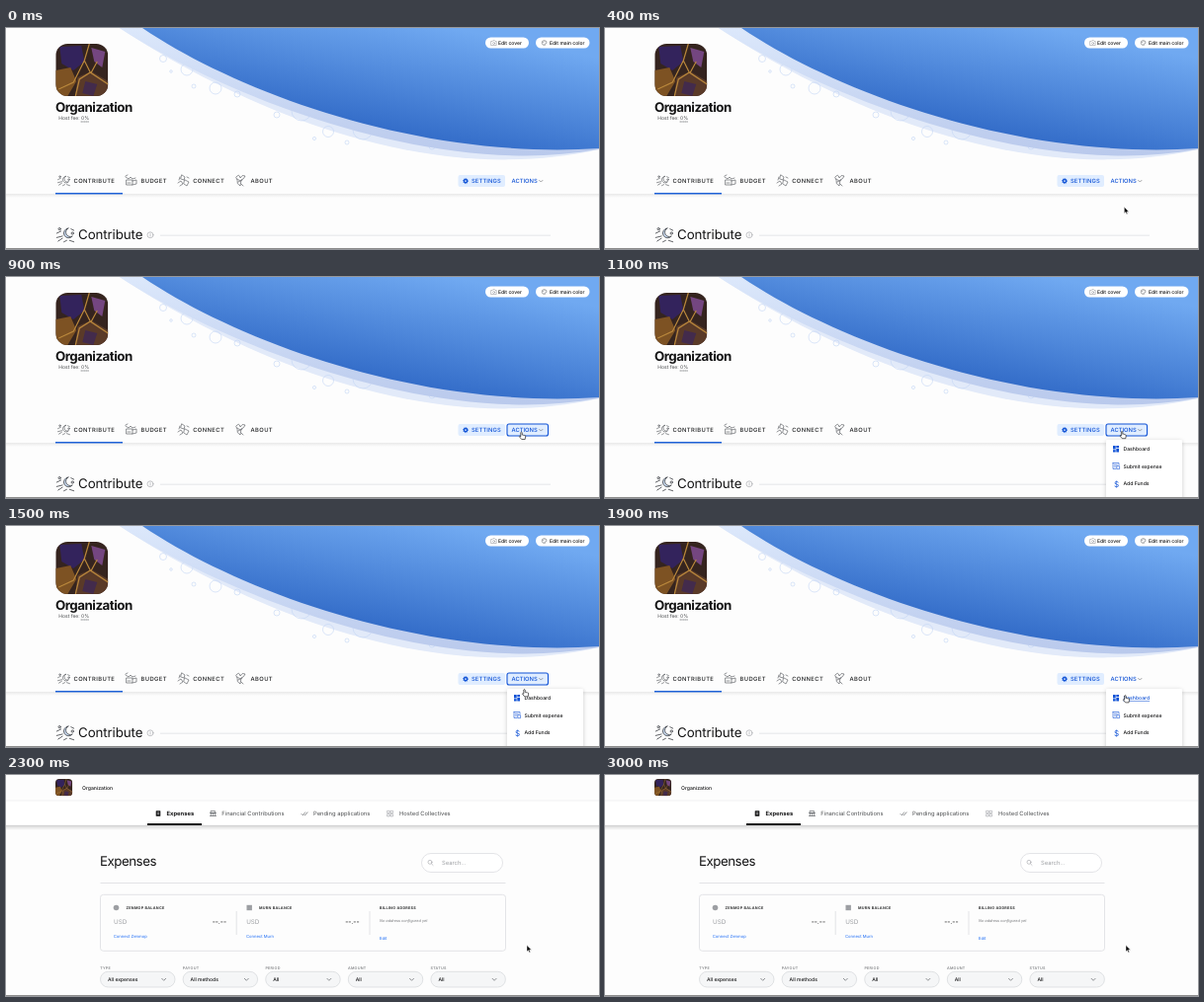
Write an HTML page that moves like this. It is 600 px wide and 224 px high and loops after 5000 ms.

```html
<!DOCTYPE html>
<html lang="en">
<head>
<meta charset="utf-8">
<title>Organization dashboard</title>
<style>
  html, body { margin: 0; width: 100%; height: 100%; overflow: hidden; background: #fdfdfd; }
  svg { display: block; font: 5px Inter, sans-serif; fill: #141415; text-rendering: geometricPrecision; }
  .line { fill: none; stroke: #4b4e52; stroke-width: .6; stroke-linecap: round; stroke-linejoin: round; }
  .thin { fill: none; stroke: #8c8f94; stroke-width: .5; stroke-linecap: round; }
  .medium { font-weight: 500; }
  .title { font-size: 13.33px; }
  .nav { font-size: 5.83px; font-weight: 500; letter-spacing: .4px; fill: #1f2022; }
  .button { font-size: 5.83px; font-weight: 500; fill: #1153d6; }
  .menu { font-size: 5.1px; font-weight: 500; }
  .hover { fill: #1153d6; text-decoration: underline; }
  .tabs { font-size: 5.83px; fill: #4d4f51; }
  .caps { font-size: 3.75px; font-weight: 700; letter-spacing: .25px; fill: #313233; }
  .label { font-size: 3.75px; font-weight: 500; letter-spacing: .25px; fill: #75777a; }
  .link { font-size: 4.17px; fill: #1869f5; }
  .blue { fill: #1153d6; }
</style>
</head>
<body>
<svg width="600" height="224" viewBox="0 0 600 224">
  <defs>
    <linearGradient id="sky" gradientUnits="userSpaceOnUse" x1="450" y1="0" x2="425" y2="125">
      <stop stop-color="#70a9f1"/><stop offset="1" stop-color="#2d66c4"/>
    </linearGradient>
    <linearGradient id="haze" x2="0" y2="1">
      <stop stop-color="#dce8fb"/><stop offset="1" stop-color="#b9c9ec"/>
    </linearGradient>
    <linearGradient id="shade" x2="0" y2="1">
      <stop stop-color="#000" stop-opacity=".16"/><stop offset="1" stop-color="#000" stop-opacity="0"/>
    </linearGradient>
    <filter id="soft" x="-20%" y="-20%" width="140%" height="140%">
      <feDropShadow dx="0" dy="1" stdDeviation="2" flood-opacity=".2"/>
    </filter>
    <clipPath id="rounded"><rect width="53" height="53" rx="12"/></clipPath>

    <g id="photo" clip-path="url(#rounded)">
      <path fill="#35241f" d="M0 0H53V53H0Z"/>
      <path fill="#33235c" d="M4 3 26 2 29 18 18 27 6 20Z"/>
      <path fill="#744680" d="M36 4 50 8 47 24 39 18Z"/>
      <path fill="#7d5223" d="M0 27 15 24 21 38 12 53H0Z"/>
      <path fill="#5a3a28" d="M22 34 36 28 53 38V53H20Z"/>
      <path fill="#432b4c" d="M30 38 42 41 38 53 27 50Z"/>
      <path fill="none" stroke="#b9873c" stroke-width="1.2" d="M34 0 29 17 35 29 53 41M29 17 18 39 3 46M35 29 24 36 20 53M42 18 36 29"/>
    </g>
    <g id="spark" class="line">
      <path d="M2-4.5a3.4 3.4 0 1 0 3 5.5 3 3 0 0 1-3-5.5ZM-6-1l3-1.5M-6 2l4-1M-5 4.5l3-2M3 4l3 1M4-4l2 1M-1 5l2-1"/>
      <circle cx="5" cy="-1" r=".8"/><circle cx="-4" cy="-4" r=".8"/>
    </g>
    <path id="chevron" class="line" d="M-2-1 0 1 2-1"/>
    <g id="receipt"><rect x="-2.3" y="-2.8" width="4.6" height="5.6" rx=".5"/><path stroke="#fff" stroke-width=".6" d="M-1.2-1H1.2M-1.2.6H1.2"/></g>

    <path id="arrow" fill="#000" stroke="#fff" stroke-width=".5" d="M0 0V6.6L1.5 5.2 2.5 7.5 3.6 7 2.6 4.8H4.7Z"/>
    <path id="hand" fill="#fff" stroke="#111" stroke-width=".65" stroke-linejoin="round" d="M-.7.5Q0-.5.7.5V3Q1.5 2.4 2 3.2 2.8 2.7 3.2 3.6 4.2 3.4 4.2 4.5L3.7 7.4H.2L-2.1 4.7Q-2 3.7-.7 4.6Z"/>
  </defs>

  <g id="profile">
    <path fill="#e2eaf9" d="M115 0C215 66 410 166 600 123V0Z"/>
    <g id="bubbles" fill="none" stroke="#c3d5f5" stroke-width=".6"></g>
    <path fill="url(#haze)" d="M115 0C215 66 430 154 600 123V0Z"/>
    <path fill="url(#sky)" d="M138 0C235 66 420 134 600 122V0Z"/>

    <g fill="#fff">
      <rect x="485" y="9.5" width="44" height="11" rx="5.5"/>
      <rect x="536" y="9.5" width="54.5" height="11" rx="5.5"/>
    </g>
    <g class="thin">
      <path d="M491 13.5h1.2l.6-.9h1.6l.6.9h1.2v4H491Z"/><circle cx="493.6" cy="15.5" r="1"/>
      <path stroke="#4b4e52" d="M545 17.4a2.4 2.4 0 1 1 2-2.3c0 1-1.8.2-1.8 1.1ZM543.3 14.5h.1M544.8 13.8h.1"/>
    </g>
    <g class="medium"><text x="498" y="16.8">Edit cover</text><text x="550" y="16.8">Edit main color</text></g>

    <use href="#photo" x="50.3" y="16"/>
    <text class="title" x="50" y="84.6" font-weight="700" letter-spacing="-.5">Organization</text>
    <text x="53.3" y="93.2" fill="#4d4f51">Host fee: 0%</text>
    <path class="line" stroke-dasharray=".7 1" d="M76 95H84"/>

    <path fill="url(#shade)" opacity=".5" d="M0 168H600V172H0Z"/>
    <path fill="#1f62d8" d="M50 167H118V168.4H50Z"/>
    <use href="#spark" x="58.5" y="154.7"/>
    <g class="line">
      <path d="M121 151l3 2 2-2 2 2 3-1M122 154h6v5h-6ZM128 155l4-1v4l-4 1M123 157h3M121 150l2-1"/>
      <path d="M178 149l3 2-1 3-3-1ZM181 154l4 2-2 4-3-2ZM174 157l3-2 2 3-3 2M176 151l-1 3M183 151l2 1"/>
      <path d="M233 151q3-4 4 1 2-4 5-2-1 3-4 4l-1 6q-4-2-3-5ZM235 156l4-2M238 158l2 2M234 153l3 2"/>
    </g>
    <g class="nav">
      <text x="68.5" y="156.8">CONTRIBUTE</text><text x="136.5" y="156.8">BUDGET</text>
      <text x="189.2" y="156.8">CONNECT</text><text x="247.5" y="156.8">ABOUT</text>
    </g>

    <rect x="457.5" y="149" width="47.5" height="12" rx="2" fill="#e0edff"/>
    <rect id="actions" x="507" y="149" width="41.5" height="12" rx="2" fill="#e0edff" stroke="#1153d6" stroke-width="1.1"/>
    <circle cx="465" cy="155.1" r="1.6" fill="none" stroke="#1153d6" stroke-width="1.4"/>
    <circle cx="465" cy="155.1" r="2.5" fill="none" stroke="#1153d6" stroke-width=".7" stroke-dasharray="1 .963"/>
    <g class="button"><text x="471" y="157.3" letter-spacing=".1">SETTINGS</text><text x="511.5" y="157.3">ACTIONS</text></g>
    <use href="#chevron" transform="translate(541.3 155.2) scale(.85)"/>

    <g transform="translate(60 209.5) scale(1.45)">
      <path fill="#c9dbf2" d="M2-4.5a3.4 3.4 0 1 0 3 5.5 3 3 0 0 1-3-5.5Z"/>
      <use href="#spark"/>
    </g>
    <text class="title" x="73" y="214.1" letter-spacing="-.1">Contribute</text>
    <g class="thin"><circle cx="146" cy="209.8" r="3"/><path d="M146 209.5v1.6M146 208.2v.1"/></g>
    <path fill="#dcdee1" d="M156 209.8H551V210.6H156Z"/>

    <g id="menu">
      <rect x="507" y="165" width="77" height="70" rx="2" fill="#fff" filter="url(#soft)"/>
      <path class="blue" d="M514 171h2.7v3.6H514ZM517.3 171h2.7v2.2h-2.7ZM514 175.3h2.7v2.2H514ZM517.3 173.9h2.7v3.6h-2.7Z"/>
      <path class="line" style="stroke:#1153d6" d="M514 188.5h6v2M514 188.5v6h3M515.3 190.3h3M515.3 192.2h2M518.2 191.7h2.4v3h-2.4Z"/>
      <text class="blue" x="514.9" y="212.5" font-size="8">$</text>
      <g class="menu">
        <text id="dashboard" x="524.5" y="176">Dashboard</text>
        <text x="524.5" y="193.5">Submit expense</text><text x="524.5" y="211.4">Add Funds</text>
      </g>
    </g>
  </g>

  <g id="expenses">
    <use href="#photo" transform="translate(50 4) scale(.325)"/>
    <text class="medium" x="77" y="14.6" font-size="5.1">Organization</text>
    <path fill="#fff" stroke="#ececee" stroke-width=".7" d="M-1 26H601V51H-1Z"/>
    <path fill="url(#shade)" d="M0 51H600V56H0Z"/>
    <path d="M143 49H198V51H143Z"/>
    <use href="#receipt" x="154" y="39"/>
    <path class="line" d="M206.5 41.5h6M207.5 39v2M209.5 39v2M211.5 39v2M206.5 38.5h6M207.5 36.5h4v2h-4Z"/>
    <path class="line" d="M299 39.5l1.3 1.3 2.4-3M302 40.5l.6.3 2.4-3"/>
    <path class="thin" d="M386 36.3h2.2v2.2H386ZM389.4 36.3h2.2v2.2h-2.2ZM386 39.7h2.2v2.2H386ZM389.4 39.7h2.2v2.2h-2.2Z"/>
    <g class="tabs">
      <text x="162.5" y="41.1" font-weight="700" fill="#141415">Expenses</text>
      <text x="218.3" y="41.1">Financial Contributions</text>
      <text x="311" y="41.1">Pending applications</text>
      <text x="398" y="41.1">Hosted Collectives</text>
    </g>

    <text class="title" x="95" y="92.2" letter-spacing="-.5">Expenses</text>
    <g fill="none" stroke="#dcdee1" stroke-width=".8">
      <rect x="420.5" y="79.5" width="82" height="19" rx="9.5" fill="#fff"/>
      <path d="M95.5 109.5H505.5M233.2 138V162M368 138V162"/>
      <rect x="95.5" y="121.3" width="410" height="57" rx="3"/>
    </g>
    <g class="thin"><circle cx="429" cy="88.3" r="2"/><path d="M430.6 90l1.5 1.5"/></g>
    <text x="441" y="91" font-size="5.83" fill="#9d9fa3">Search...</text>

    <circle cx="111.5" cy="134.5" r="2.8" fill="#9d9fa3"/>
    <rect x="243.5" y="131.8" width="5.4" height="5.4" fill="#9d9fa3"/>
    <g class="caps">
      <text x="121.5" y="135.8">ZENMOP BALANCE</text><text x="256" y="135.8">MURN BALANCE</text>
      <text x="378" y="135.8">BILLING ADDRESS</text>
    </g>
    <g font-size="6.25" fill="#9d9fa3"><text x="109" y="150.6">USD</text><text x="243.2" y="150.6">USD</text></g>
    <g class="medium" font-size="6.67" text-anchor="end"><text x="223" y="150.6">--.--</text><text x="357.5" y="150.6">--.--</text></g>
    <g class="link">
      <text x="108.8" y="165.4">Connect Zenmop</text><text x="243" y="165.4">Connect Murn</text><text x="378" y="167.2">Edit</text>
    </g>
    <text x="378" y="149.3" font-size="3.85" font-style="italic" fill="#75777a">No address configured yet</text>
    <g id="filters"></g>
  </g>

  <path fill="#8e8e8e" d="M0 223H600V224H0Z"/>
  <use id="cursor"/>
</svg>
<script>
const $ = id => document.getElementById(id);
const show = (id, on) => $(id).style.display = on ? '' : 'none';

const bubbles = [[159, 31, 3.5], [167, 44, 1.3], [183, 42, 6], [190, 59, 2], [212, 61, 6], [234, 67, 3],
  [274, 88, 3], [299, 84, 10], [312, 112, 1.6], [326, 105, 5.5], [345, 116, 2],
  [361, 103, 10], [400, 111, 3], [431, 120, 3]];
$('bubbles').innerHTML = bubbles.map(([x, y, r]) => `<circle cx="${x}" cy="${y}" r="${r}"/>`).join('');

const filters = [['TYPE', 'All expenses'], ['PAYOUT', 'All methods'], ['PERIOD', 'All'], ['AMOUNT', 'All'], ['STATUS', 'All']];
$('filters').innerHTML = filters.map(([label, value], i) => `<g transform="translate(${95.2 + i * 83.6} 0)">
  <text class="label" y="197.3">${label}</text>
  <rect x=".3" y="199.3" width="75.5" height="15.7" rx="7.8" fill="#f5f6f7" stroke="#d5d7da" stroke-width=".7"/>
  <text class="medium" x="7.8" y="209">${value}</text>
  <use href="#chevron" x="64.5" y="207.3"/></g>`).join('');

// Pointer tip over time: [ms, x, y]
const path = [[100, 531, 218], [300, 528, 190], [600, 520, 164], [700, 518.5, 158.7], [1000, 523, 156.3],
  [1400, 523.3, 156.3], [1500, 524.5, 165.5], [1700, 526, 171], [1800, 526, 171], [2100, 527, 172.5], [5000, 527, 172.5]];

function pointer(t) {
  const i = Math.max(1, path.findIndex(p => p[0] >= t));
  const [t0, x0, y0] = path[i - 1], [t1, x1, y1] = path[i];
  const k = (t - t0) / (t1 - t0);
  return [x0 + (x1 - x0) * k, y0 + (y1 - y0) * k];
}

function draw(now) {
  const t = Math.floor(now % 5000 / 100) * 100;
  const onProfile = t < 2300;
  show('profile', onProfile);
  show('expenses', !onProfile);
  show('actions', t >= 700 && t < 1900);
  $('actions').style.strokeOpacity = t >= 900 ? 1 : 0;
  show('menu', t >= 1000);
  $('dashboard').classList.toggle('hover', t >= 1600);
  show('cursor', t >= 100);
  $('cursor').setAttribute('href', t >= 700 && onProfile ? '#hand' : '#arrow');
  $('cursor').setAttribute('transform', `translate(${pointer(t)})`);
  requestAnimationFrame(draw);
}
requestAnimationFrame(draw);
</script>
</body>
</html>
```
